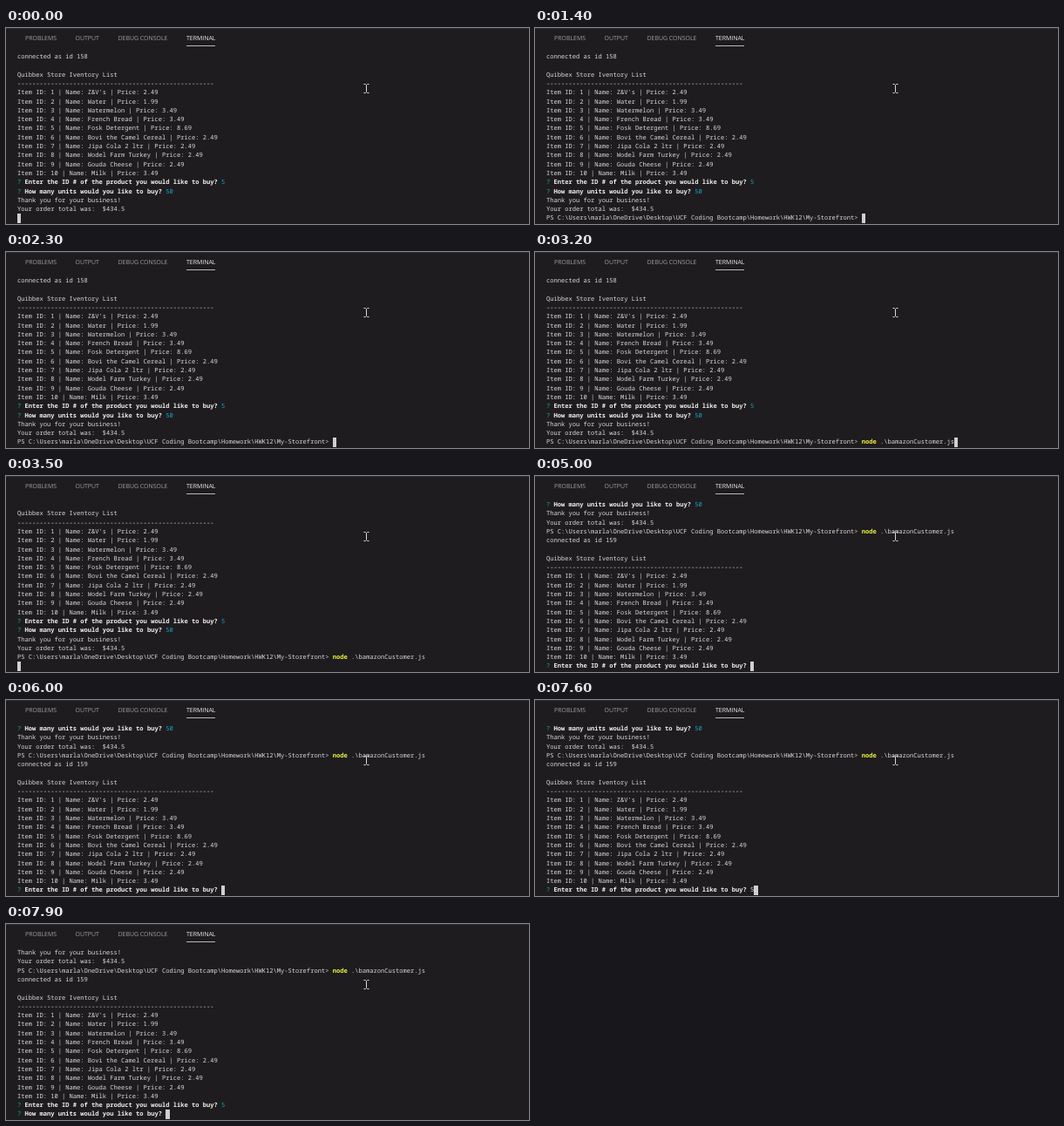
An HTML page that plays this animation: 600x225 px, repeating every 8000 ms.

```html
<!DOCTYPE html>
<html lang="en">
<head>
<meta charset="utf-8">
<title>Terminal</title>
<style>
  html, body { margin: 0; width: 100%; height: 100%; overflow: hidden; background: #1e1c1e; }
  #stage { position: relative; width: 600px; height: 225px; overflow: hidden; text-rendering: geometricPrecision; }
  #edge { position: absolute; top: 0; width: 600px; height: 1px; background: #303030; }
  .tab { position: absolute; top: 7px; font: 6.96px/12px "Open Sans", "Noto Sans", sans-serif; color: #a0a0a0; white-space: pre; }
  .tab.on { color: #f0f0f0; height: 13px; font-weight: 500; border-bottom: 1px solid #b8b8b8; }
  #screen { position: absolute; left: 12.9px; top: 28.1px; margin: 0; color: #dcdcdc;
    font: 500 7.1px/10.3px "Noto Sans Mono", "DejaVu Sans Mono", monospace; font-variant-ligatures: none; }
  #screen b { color: #f0f0f0; }
  .green { color: #0dbc79; }
  .cyan { color: #11a8cd; }
  .yellow { color: #f5f543; font-weight: 600; }
  .caret { display: inline-block; width: 4.4px; height: 10.3px; vertical-align: top; background: #d0d0d0; }
  #mouse { position: absolute; left: 409px; top: 63px; }
</style>
</head>
<body>
<div id="stage">
  <div id="edge"></div>
  <div class="tab" style="left:22px">PROBLEMS</div>
  <div class="tab" style="left:79.5px">OUTPUT</div>
  <div class="tab" style="left:128.5px">DEBUG CONSOLE</div>
  <div class="tab on" style="left:207px">TERMINAL</div>
  <pre id="screen"></pre>
  <svg id="mouse" width="9" height="13" fill="none" stroke="#d8d8d8">
    <path d="M1.5 1.5H3.5L4.5 2.5L5.5 1.5H7.5M4.5 2.5V10.5M1.5 11.5H3.5L4.5 10.5L5.5 11.5H7.5"/>
  </svg>
</div>
<script>
const LOOP = 8000, ROWS = 19;
const screen = document.getElementById('screen');

const paint = (cls, text) => `<span class="${cls}">${text}</span>`;
const ask = (question, answer = '') => `${paint('green', '?')} <b>${question}</b> ${answer}`;
const askId = answer => ask('Enter the ID # of the product you would like to buy?', answer);
const askUnits = answer => ask('How many units would you like to buy?', answer);

const products = [
  ["Z&amp;V's", 2.49], ['Water', 1.99], ['Watermelon', 3.49], ['French Bread', 3.49],
  ['Fosk Detergent', 8.69], ['Bovi the Camel Cereal', 2.49], ['Jipa Cola 2 ltr', 2.49],
  ['Wodel Farm Turkey', 2.49], ['Gouda Cheese', 2.49], ['Milk', 3.49]
];
const store = id => [
  `connected as id ${id}`, '', 'Quibbex Store Iventory List', '-'.repeat(53),
  ...products.map(([name, price], i) => `Item ID: ${i + 1} | Name: ${name} | Price: ${price}`)
];

const five = paint('cyan', 5);
const prompt = 'PS C:\\Users\\marla\\OneDrive\\Desktop\\UCF Coding Bootcamp\\Homework\\HWK12\\My-Storefront> ';
const command = prompt + paint('yellow', 'node') + ' .\\bamazonCustomer.js';
const order = [...store(158), askId(five), askUnits(paint('cyan', 50)),
  'Thank you for your business!', 'Your order total was:  $434.5'];
const rerun = [...order, command, ...store(159)];

// [start time, terminal buffer]; the caret follows the last line
const steps = [
  [0, [...order, '']],
  [1300, [...order, prompt]],
  [2700, [...order, command]],
  [3400, [...order, command, '']],
  [5000, [...rerun, askId()]],
  [7200, [...rerun, askId('5')]],
  [7700, [...rerun, askId(five), askUnits()]]
];

let shown;
function draw() {
  const t = performance.now() % LOOP;
  const step = steps.findLast(([start]) => start <= t);
  if (step !== shown) {
    shown = step;
    screen.innerHTML = step[1].slice(-ROWS).join('\n') + '<span class="caret"></span>';
  }
  requestAnimationFrame(draw);
}
draw();
</script>
</body>
</html>
```
